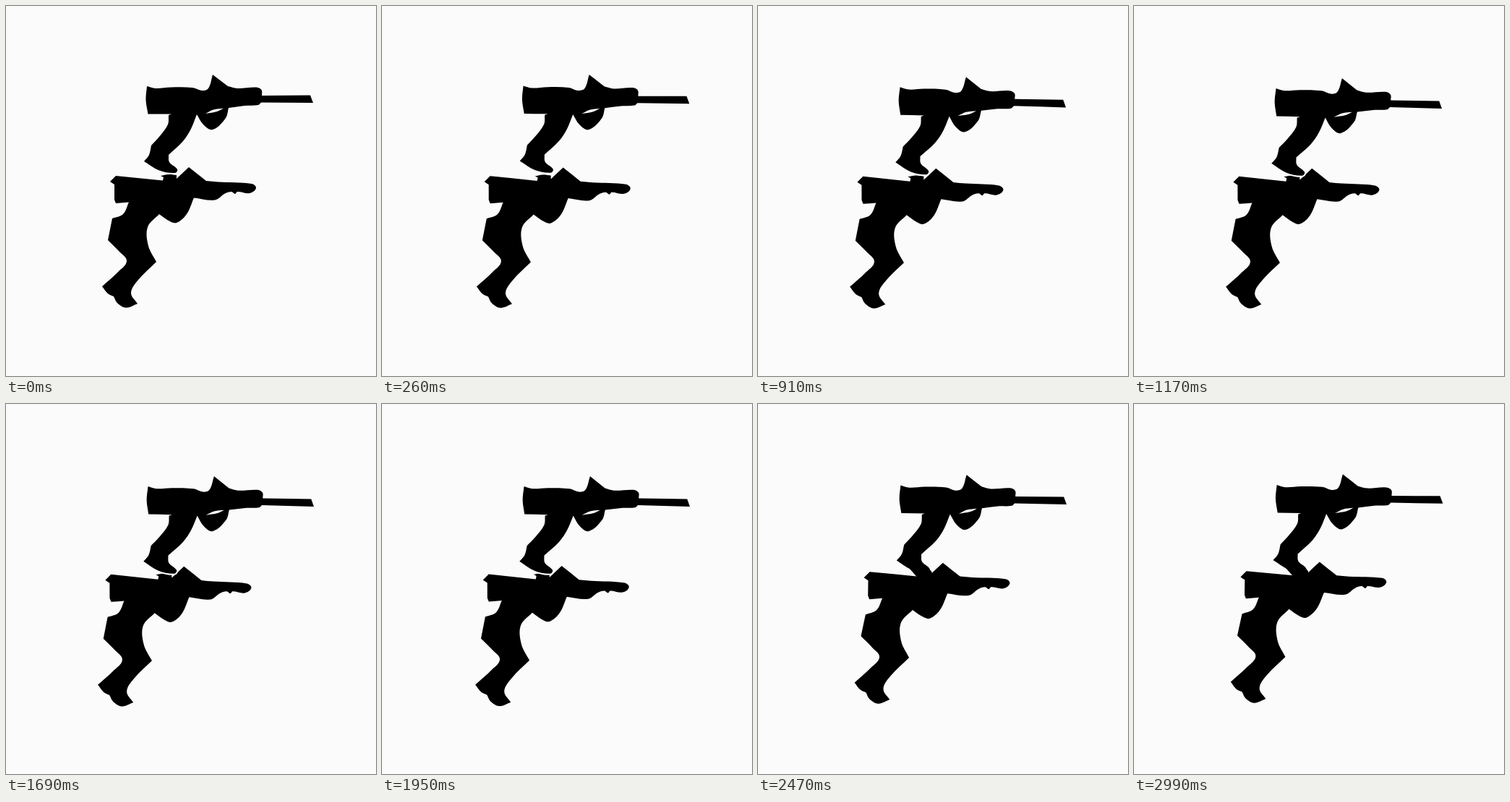
An HTML page with a canvas that plays this animation: 512 px wide and 512 px high, repeating every 3120 ms.

```html
<!DOCTYPE html>
<html lang="en">
<head>
<meta charset="utf-8">
<title>Drifting silhouettes</title>
<style>
  html, body { margin: 0; width: 100%; height: 100%; overflow: hidden; background: #fbfbfb; }
  canvas { display: block; }
</style>
</head>
<body>
<canvas id="stage" width="512" height="512"></canvas>
<script>
const ctx = document.getElementById('stage').getContext('2d');
const STEP = 130, STEPS = 24, PAPER = '#fbfbfb', INK = '#000';

// Closed outline through key points; "~" marks a smooth point, the others are corners
function outline(text) {
  const points = text.trim().split(/\s+/).map(word => {
    const [x, y] = word.replace('~', '').split(',').map(Number);
    return { x, y, smooth: word[0] === '~' };
  });
  const at = i => points[(i + points.length) % points.length];
  const handle = (i, side) => {
    const p = at(i), next = at(i + side), from = p.smooth ? at(i - side) : p;
    const scale = Math.hypot(next.x - p.x, next.y - p.y) / 3 / Math.hypot(next.x - from.x, next.y - from.y);
    return [p.x + (next.x - from.x) * scale, p.y + (next.y - from.y) * scale];
  };
  const path = new Path2D();
  path.moveTo(points[0].x, points[0].y);
  points.forEach((p, i) => {
    const end = at(i + 1);
    path.bezierCurveTo(...handle(i, 1), ...handle(i + 1, -1), end.x, end.y);
  });
  path.closePath();
  return path;
}

const upper = outline(`195,111 ~207,114 ~228,112.5 ~258,113 ~271,117 ~280,114 286,95 307,111
  ~320,114 ~346,112.5 ~353.5,116 354,124 421,123.5 425,134 353,133.5 ~349,137 ~330,138 308,141
  ~304,155 ~286,171 ~273,164 264,150 ~256,170 ~245,187 225,206 ~226,216 ~237,226 ~234,231
  ~212,227.5 191,215 ~198,206 201,193 ~212,181 ~224,164 225,151 229,149.5 196.5,149.5 ~193.5,130`);
const slit = outline('276,149 ~287,143.5 301,141.5 ~292,146');
const bridge = outline('208,225 236,226 ~240,231 237,241 219,237');
const lower = outline(`144,243 152,235 217,241.5 218,237 214,235 ~225,233 236,234 236,239 253,223
  277,242 ~294,243.5 ~340,246 ~346,252 ~337,259 ~320,257 ~317,260 ~312,257 ~303,259.5 ~289,268.5
  260,265.5 ~250,288 ~236,300 ~226,297.5 212,288 ~196,306 ~197,332 208,354 ~183,379 ~173,397
  182,412 ~166,417.5 ~154,411 149,402 ~141,398 133,388 ~155,368 ~167,353 ~157,340 141,324
  147,294 ~162,288 170,271.5 152,273 150,268 150,247`);

function ease(step, from, to) {
  const t = Math.min(1, Math.max(0, (step - from) / (to - from)));
  return t * t * (3 - 2 * t);
}

// Shift and shear around a pivot
function place(px, py, x, y, slope, lean) {
  ctx.setTransform(1, slope, lean, 1, x - lean * py, y - slope * px);
}

function fill(path, colour) {
  ctx.fillStyle = colour;
  ctx.fill(path);
}

function draw(now) {
  const step = Math.floor(now / STEP) % STEPS;
  const swing = ease(step, 0, 5), drop = ease(step, 4, 9), rise = ease(step, 15, 21);
  const back = swing - ease(step, 13, 18);
  const touching = step >= 16;

  ctx.resetTransform();
  ctx.fillStyle = PAPER;
  ctx.fillRect(0, 0, 512, 512);

  place(220, 310, 2.2 * rise - 6.3 * back, 1.4 * back - 4.2 * rise,
    0.009 * back - 0.008 * rise, 0.005 * back - 0.018 * rise);
  fill(lower, INK);

  const turn = 0.022 * swing - 0.01 * rise;
  place(270, 150, 0.7 * swing + 1.5 * rise, 4.6 * drop - 2.6 * rise, turn, -turn);
  if (touching) {
    fill(bridge, INK);
  } else {
    // Keep a thin gap between the figures
    ctx.strokeStyle = PAPER;
    ctx.lineWidth = 4;
    ctx.stroke(upper);
  }
  fill(upper, INK);
  fill(slit, PAPER);
}

const start = performance.now();
function tick() {
  draw(performance.now() - start);
  requestAnimationFrame(tick);
}
tick();
</script>
</body>
</html>
```
